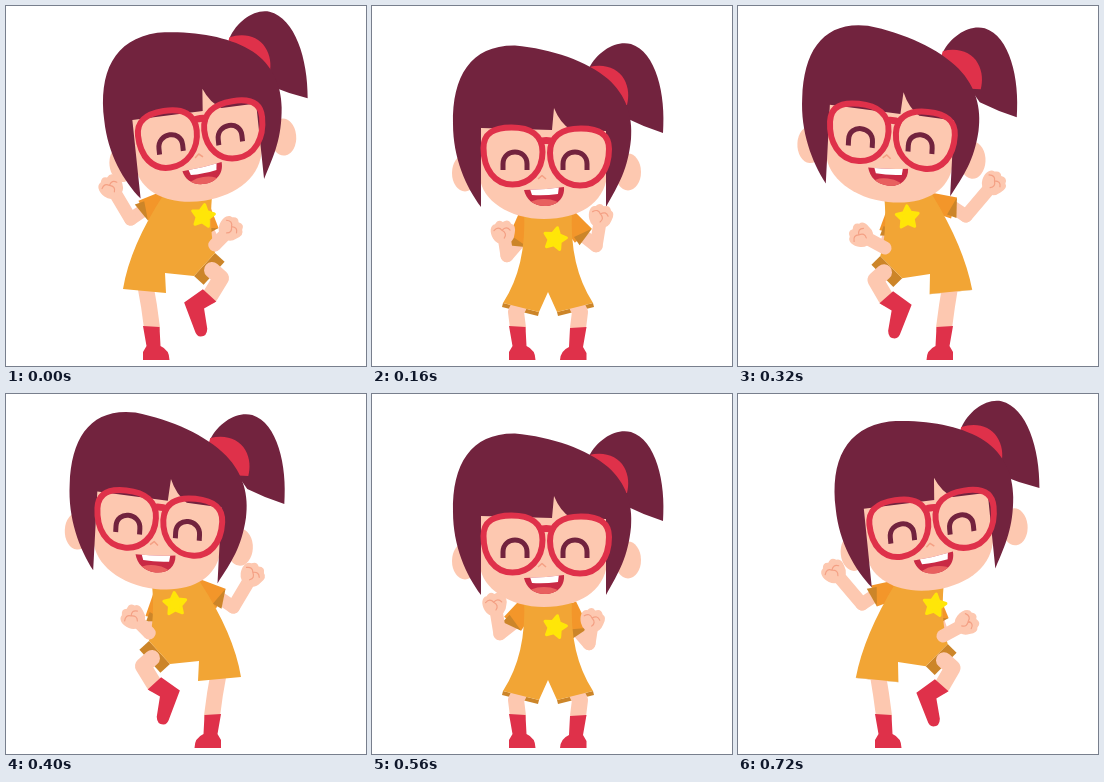
Recreate the animation shown at these times as an HTML page with a canvas. Size 360x360 px, loop 800 ms.

```html
<!DOCTYPE html>
<html lang="en">
<head>
<meta charset="utf-8">
<title>Dancing girl</title>
<style>
html, body { margin: 0; width: 100%; height: 100%; overflow: hidden; background: #fff; }
canvas { display: block; }
</style>
</head>
<body>
<canvas id="stage" width="360" height="360"></canvas>
<script>
const ctx = document.getElementById('stage').getContext('2d');
const STEP = 80, STEPS = 10, MIRROR = 352, FLOOR = 354;
const HAIR = '#72233e', RED = '#df314a', SKIN = '#fdc8b0', LINE = '#f4a084';
const CLOTH = '#f2a535', SLEEVE = '#f3962a', INSIDE = '#cc8529', STAR = '#ffe608';

// Sideways lean over half a loop; the other half is its opposite.
const leanKeys = [1, 0.9, 0, -0.4, -0.97];

// Left half of the squat and the full one-legged lean, as x, y pairs:
// shoulder, waist, outer hem, inner hem, crotch, then back up the other side.
const squat = [152, 205, 155, 260, 131, 297, 167, 306, 176, 286];
const leaning = [158, 188, 124, 240, 117, 283, 160, 287, 159, 267, 188, 270, 209, 247, 203, 225, 206, 190];

// hip, knee, ankle
const squatLeg = [147, 300, 144, 306, 146, 322];
const standingLeg = [140, 283, 143, 300, 146, 322];
const raisedLeg = [206, 264, 215, 272, 204, 290];

// shoulder, cuff, elbow, fist
const armLow = [157, 208, 152, 226, 147, 241, 123, 228];
const armMid = [154, 196, 143, 217, 131, 228, 129, 201];
const armHigh = [165, 193, 136, 201, 124, 209, 96, 176];

const rad = deg => deg * Math.PI / 180;
const mix = (a, b, t) => a + (b - a) * t;
const blend = (from, to, t) => from.map((v, i) => mix(v, to[i], t));
const mirror = pts => pts.map((v, i) => i % 2 ? v : MIRROR - v);

function mirroredOutline(half) {
  const pts = half.slice();
  for (let i = half.length - 4; i >= 0; i -= 2) pts.push(MIRROR - half[i], half[i + 1]);
  return pts;
}

const squatting = mirroredOutline(squat);

function leanAt(step) {
  return leanKeys[step % 5] * (step < 5 ? 1 : -1);
}

// The fist swings through three key positions and sinks with the squat.
function armAt(step, drop) {
  const s = -Math.cos((step - 4) / STEPS * 2 * Math.PI);
  return armMid.map((mid, i) => {
    const low = armLow[i], high = armHigh[i];
    return mid + s * (high - low) / 2 + s * s * ((high + low) / 2 - mid) + (i % 2 ? drop : 0);
  });
}

function fill(d, color) {
  ctx.fillStyle = color;
  ctx.fill(new Path2D(d));
}

function stroke(d, color, width) {
  ctx.strokeStyle = color;
  ctx.lineWidth = width;
  ctx.stroke(new Path2D(d));
}

function disc(x, y, rx, ry, color) {
  ctx.fillStyle = color;
  ctx.beginPath();
  ctx.ellipse(x, y, rx, ry, 0, 0, 7);
  ctx.fill();
}

function within(draw) {
  ctx.save();
  draw();
  ctx.restore();
}

function boot(x, y, deg, dir) {
  within(() => {
    ctx.translate(x, y);
    ctx.rotate(rad(deg));
    ctx.scale(dir, 1);
    fill(deg ? 'M-9 2 L9 -1 L7 13 L25 23 Q31 28 27 33 Q24 36 19 34 L-10 25 Z'
      : 'M-8.5 0 L8 1 L9 20 Q18 24 18 34 L-8.5 34 L-8.5 26 L-5 20 Z', RED);
  });
}

function leg([hx, hy, kx, ky, ax, ay]) {
  stroke(`M${hx} ${hy} L${kx} ${ky} L${ax} ${ay}`, SKIN, 16);
}

// The inside of a trouser leg, showing beyond its hem.
function opening(x1, y1, x2, y2, depth) {
  const len = Math.hypot(x2 - x1, y2 - y1);
  const nx = (y1 - y2) / len * depth, ny = (x2 - x1) / len * depth;
  fill(`M${x1} ${y1} L${x1 + nx} ${y1 + ny} L${x2 + nx} ${y2 + ny} L${x2} ${y2} Z`, INSIDE);
}

function torso(p) {
  const at = i => `${p[2 * i]} ${p[2 * i + 1]}`;
  fill(`M${at(0)} Q${at(1)} ${at(2)} L${at(3)} L${at(4)} L${at(5)} L${at(6)} Q${at(7)} ${at(8)} Z`, CLOTH);
}

function sleeve([sx, sy, cx, cy, ex, ey]) {
  stroke(`M${sx} ${sy} L${cx} ${cy} L${ex} ${ey}`, SKIN, 13);
  const len = Math.hypot(cx - sx, cy - sy);
  within(() => {
    ctx.translate(sx, sy);
    ctx.rotate(Math.atan2(cy - sy, cx - sx));
    fill(`M-6 -8 L${len} -11 L${len} 11 L-6 9 Z`, SLEEVE);
    fill(`M${len - 5} 8 L${len} -11 L${len + 5} 9 Z`, INSIDE);
  });
}

function forearm([, , , , ex, ey, fx, fy]) {
  stroke(`M${ex} ${ey} L${fx} ${fy}`, SKIN, 13);
  within(() => {
    ctx.translate(fx, fy);
    ctx.rotate(Math.atan2(fy - ey, fx - ex) + Math.PI / 2);
    fill('M-11 5 C-14 -2 -12 -9 -7 -9 Q-3 -14 1 -10 Q7 -13 9 -7 Q14 -5 11 3 Q9 12 0 12 Q-8 12 -11 5', SKIN);
    stroke('M-9 -3 Q-4 -7 -1 -2 Q4 -6 7 -1 M-1 -2 Q4 2 0 6', LINE, 1.2);
  });
}

function lowerBody(lean) {
  const amount = Math.abs(lean), rise = lean * lean;
  const p = blend(squatting, leaning, rise);
  const raised = blend(mirror(squatLeg), raisedLeg, rise);
  opening(...p.slice(4, 8), mix(4, 0, rise));
  opening(...p.slice(10, 14), mix(4, 13, rise));
  leg(blend(squatLeg, standingLeg, rise));
  leg(raised);
  boot(145.5, 320, 0, 1);
  boot(raised[4], raised[5] - 1, 52 * Math.sqrt(amount), amount ? 1 : -1);
  return p;
}

function star(lean) {
  const x = 183 + 14 * lean, y = 233 - 23 * lean * lean;
  const turn = 12 + 6 * lean - 10 * lean * lean;
  let d = 'M';
  for (let i = 0; i < 10; i++) {
    const r = i % 2 ? 6 : 11.5, a = rad(turn + i * 36 - 90);
    d += `${x + r * Math.cos(a)} ${y + r * Math.sin(a)} `;
  }
  fill(d + 'Z', STAR);
  stroke(d + 'Z', STAR, 3);
}

function ponytail(lean) {
  const rise = lean * lean;
  within(() => {
    ctx.translate(238 + 10 * lean - 2.7 * rise, 77 - 7 * lean - 24 * rise);
    ctx.rotate(rad(-4 * Math.max(0, lean)));
    ctx.translate(-238, -77);
    fill('M217 62 C226 45 244 34 259 38 C284 46 294 88 291 127 Q272 121 254 112 L235 85 Z', HAIR);
    fill('M217 61 C232 57 246 62 252 73 C257 82 257 91 255 99 L235 98 L212 78 Z', RED);
  });
}

function lens(x, y, dir) {
  within(() => {
    ctx.translate(x, y);
    ctx.scale(dir, 1);
    stroke('M-30 -8 C-30 -24 -18 -28.5 -2 -28.5 C17 -28.5 29 -21 29 -4 C29 15 16 28.5 -1 28.5 C-19 28.5 -30 13 -30 -8 Z', RED, 6);
  });
}

function mouth() {
  within(() => {
    ctx.clip(new Path2D('M152 184 Q172 184 192 181 C193 193 184 200 173 200 C161 200 154 193 152 184 Z'));
    ctx.fillStyle = '#c92a45';
    ctx.fillRect(150, 178, 45, 25);
    disc(172, 201, 17, 8, '#e8605f');
    fill('M157 180 L187 180 L186 188 Q172 190 160 189 Z', '#fff');
  });
}

function head(lean) {
  const rise = lean * lean;
  const across = rad(-7.5 * lean - 1.5 * rise), down = rad(-4.5 * lean - 1.5 * rise);
  const shiftX = 1.5 * lean, shiftY = -3.5 * rise;
  within(() => {
    ctx.transform(Math.cos(across), Math.sin(across), -Math.sin(down), Math.cos(down),
      172 + 19.5 * lean, 150 - 18 * rise);
    ctx.translate(-172, -150);
    disc(93 + shiftX, 167 + shiftY, 13, 18.5, SKIN);
    disc(256 + shiftX, 166 + shiftY, 13, 18.5, SKIN);
    fill('M108 90 L108 172 C110 194 137 213 172 213 C207 213 232 197 235 170 L235 90 Z', SKIN);
    fill(`M109 201 C94 181 81 152 81 118 C80 70 99 39 143 39.5 C180 43 215 55 236 73
      C254 89 261 110 259 133 C256 163 247 178 234 201 L234 125 L199 124 Q188 117 182 102
      L180 124 L109 122 Z`, HAIR);
    ctx.translate(shiftX, shiftY);
    stroke('M131 164 V158 C131 142 155 142 155 158 V164 M191 164 V158 C191 142 215 142 215 158 V164', HAIR, 5);
    stroke('M166 173 L170 169.5 L174 173', LINE, 1.5);
    lens(141.5, 150, 1);
    lens(207, 151, -1);
    stroke('M166 136 Q174 133 183 136', RED, 7);
    mouth();
  });
}

function draw(step) {
  const lean = leanAt(step), drop = 17 * (1 - lean * lean);
  const arms = [armAt(step, drop), mirror(armAt(step + 5, drop))];
  const facing = paint => within(() => {
    if (lean < 0) ctx.transform(-1, 0, 0, 1, MIRROR, 0);
    return paint();
  });
  ctx.fillStyle = '#fff';
  ctx.fillRect(0, 0, 360, 360);
  within(() => {
    ctx.beginPath();
    ctx.rect(0, 0, 360, FLOOR);
    ctx.clip();
    ctx.lineJoin = ctx.lineCap = 'round';
    let outline;
    facing(() => { outline = lowerBody(lean); });
    arms.forEach(sleeve);
    facing(() => torso(outline));
    star(lean);
    ponytail(lean);
    ctx.lineCap = 'butt';
    head(lean);
    ctx.lineCap = 'round';
    arms.forEach(forearm);
  });
}

const start = performance.now();

function tick(now) {
  draw(Math.floor(Math.max(0, now - start) / STEP) % STEPS);
  requestAnimationFrame(tick);
}

draw(0);
requestAnimationFrame(tick);
</script>
</body>
</html>
```
